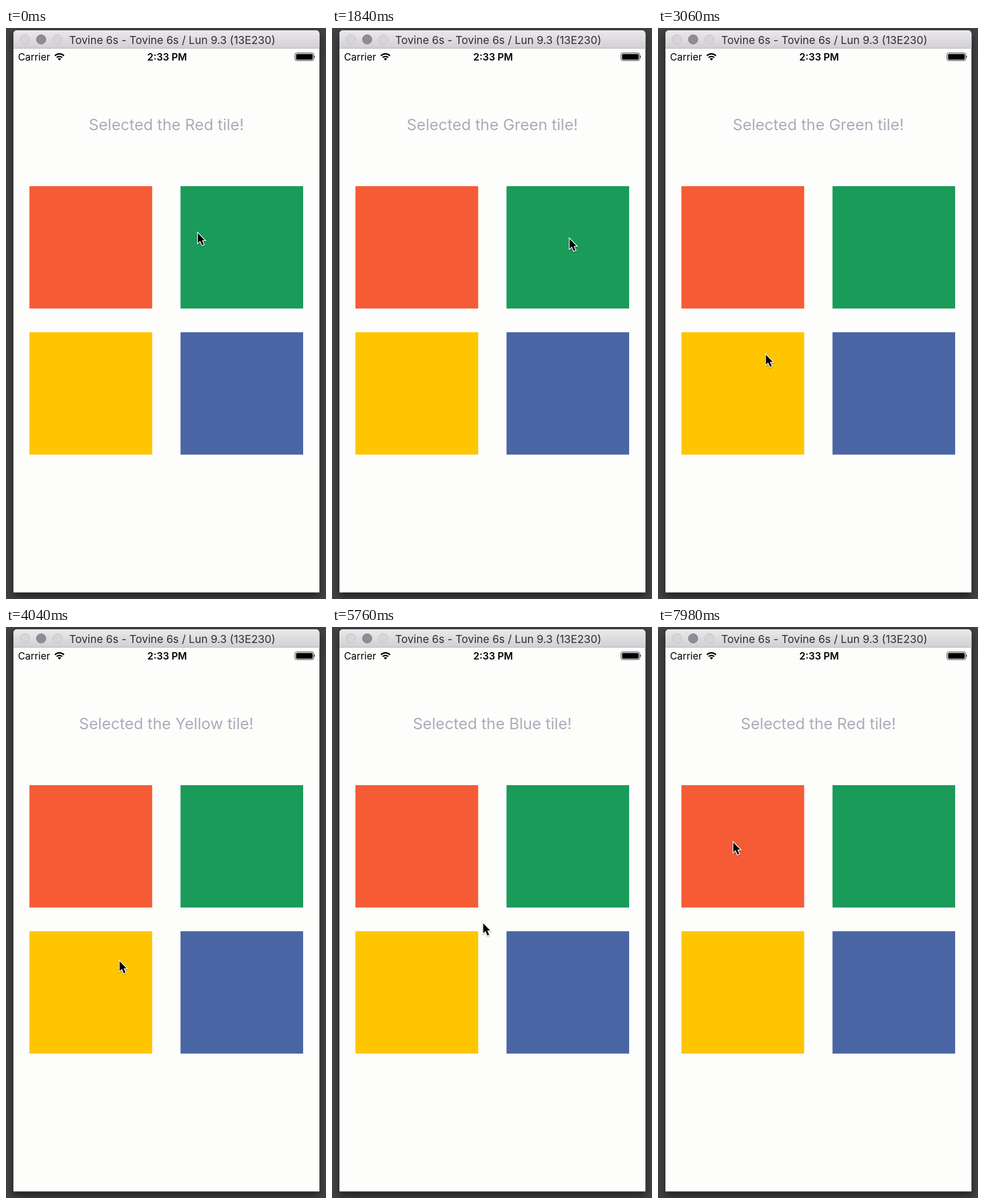
An HTML page for the animation above (8 s loop, 560x1000 px).

```html
<!DOCTYPE html>
<html lang="en">
<head>
<meta charset="utf-8">
<title>Tile picker</title>
<style>
  html, body { margin: 0; width: 100%; height: 100%; overflow: hidden; background: #424141; }
  svg { display: block; width: 560px; height: 1000px; font-family: Inter, Roboto, sans-serif; }
  #window { filter: drop-shadow(0 7px 7px rgba(0, 0, 0, .5)); }
  #cursor { filter: drop-shadow(0 1px 1px rgba(0, 0, 0, .35)); }
</style>
</head>
<body>
<svg viewBox="0 0 560 1000">
  <defs>
    <linearGradient id="bar" x2="0" y2="1">
      <stop stop-color="#ebe9ec"/>
      <stop offset="1" stop-color="#d1cfd3"/>
    </linearGradient>
  </defs>

  <g id="window">
    <path d="M13 988.4V11q0-7 7-7H541.5q7 0 7 7V988.4z" fill="#fdfdfc"/>
    <path d="M13 36V11q0-7 7-7H541.5q7 0 7 7V36z" fill="url(#bar)"/>
    <path d="M13 35.5H548.5" stroke="#b5b3b6"/>
  </g>

  <g fill="#d8d5d9" stroke="#c4c1c6">
    <circle cx="33" cy="20" r="8.2"/>
    <circle cx="61.5" cy="20" r="8.2" fill="#8f8c94" stroke="#807d85"/>
    <circle cx="90" cy="20" r="8.2"/>
  </g>
  <text x="110.5" y="27.5" font-size="18.95" fill="#302e32">Tovine 6s - Tovine 6s / Lun 9.3 (13E230)</text>

  <g font-size="17.2">
    <text x="21" y="56.7">Carrier</text>
    <text x="282" y="56.7" font-weight="600" text-anchor="middle">2:33 PM</text>
  </g>
  <g fill="none" stroke="#000" stroke-width="2.3">
    <path d="M85.6 48.6a11 11 0 0 1 15.8 0M88.6 51.8a7 7 0 0 1 9.8 0"/>
    <path d="M93.5 57l-2.9-3a4 4 0 0 1 5.8 0z" fill="#000" stroke="none"/>
  </g>
  <rect x="505.7" y="43.7" width="32.9" height="13.4" rx="2.8" fill="none" stroke="#222" stroke-width=".9"/>
  <rect x="507.6" y="45.4" width="29.2" height="10" rx="1.6"/>
  <path d="M539.4 48.2q2.4 2.2 0 4.4z"/>

  <text id="label" x="280.5" y="178.8" font-size="27.2" fill="#a9adb9" text-anchor="middle"></text>

  <rect x="41" y="277" width="214.8" height="214.3" fill="#f55c36"/>
  <rect x="305.4" y="277" width="214.6" height="214.3" fill="#1a9b5a"/>
  <rect x="41" y="532.8" width="214.8" height="214.3" fill="#fec500"/>
  <rect x="305.4" y="532.8" width="214.6" height="214.3" fill="#4a65a3"/>

  <path id="cursor" d="M1.8 3.2V20.4L5.8 16.7L9.2 24.6L12.2 23.3L8.9 15.7H13.8Z"
        stroke="#fff" stroke-width="2.6" paint-order="stroke"/>
</svg>
<script>
  const LOOP = 8000;
  // Pointer stops: time in ms, x, y
  const stops = [
    [0, 334, 356], [500, 414, 366], [2050, 414, 366],
    [2850, 187, 569], [3060, 187, 569], [3450, 197, 582], [4080, 197, 582],
    [4750, 378, 638], [5400, 378, 638],
    [6150, 134, 379], [6500, 134, 379], [6800, 130, 374], [LOOP, 130, 374]
  ];
  const picks = [[0, 'Red'], [1250, 'Green'], [3550, 'Yellow'], [4950, 'Blue'], [6900, 'Red']];

  const label = document.getElementById('label');
  const cursor = document.getElementById('cursor');
  const ease = p => p * p * (3 - 2 * p);

  function draw() {
    const time = performance.now() % LOOP;
    const next = stops.findIndex(stop => stop[0] > time);
    const [t0, x0, y0] = stops[next - 1];
    const [t1, x1, y1] = stops[next];
    const p = ease((time - t0) / (t1 - t0));
    cursor.setAttribute('transform', `translate(${x0 + (x1 - x0) * p} ${y0 + (y1 - y0) * p})`);

    const color = picks.filter(pick => pick[0] <= time).pop()[1];
    label.textContent = `Selected the ${color} tile!`;
    requestAnimationFrame(draw);
  }
  draw();
</script>
</body>
</html>
```
